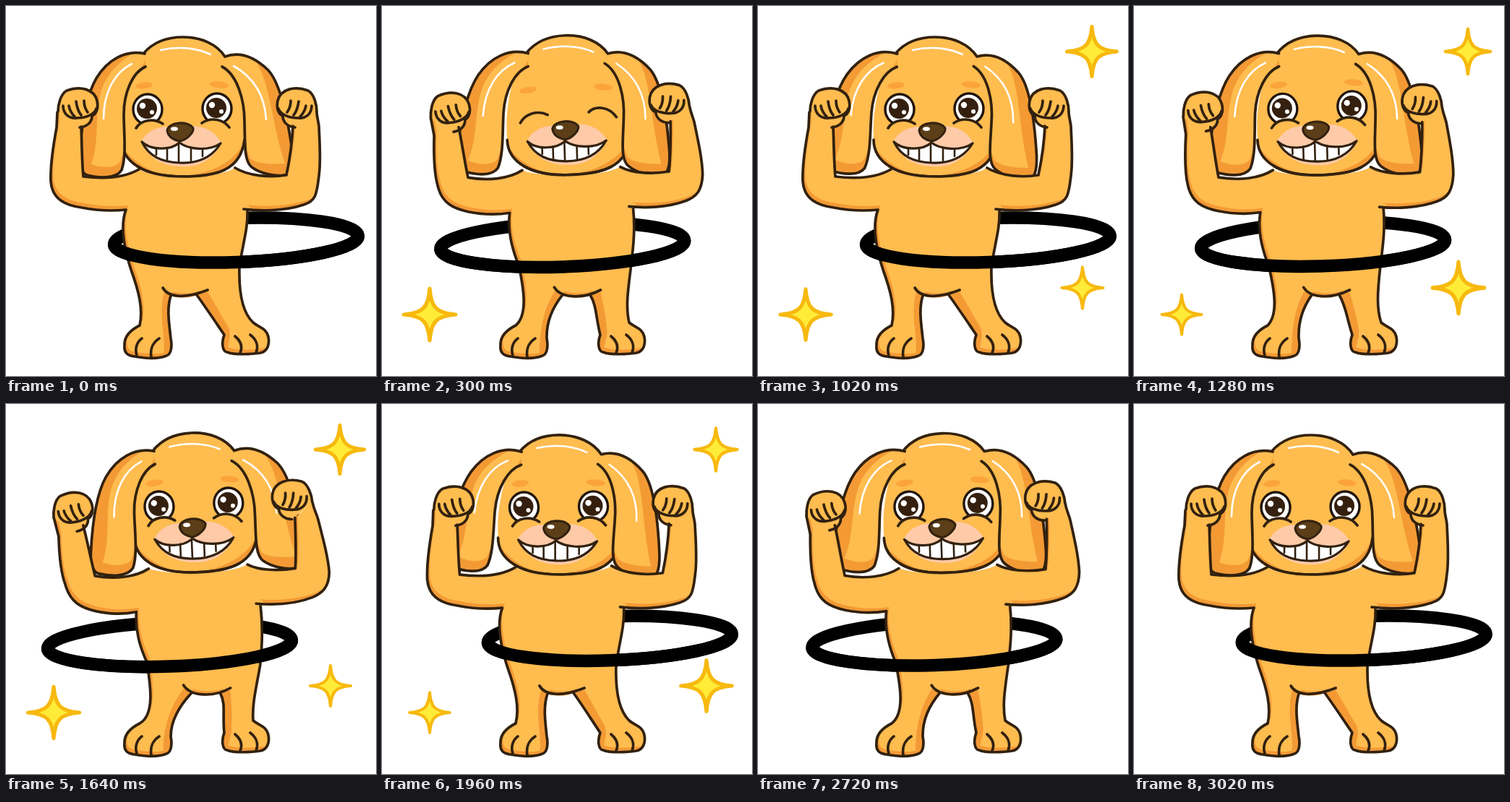
Recreate the animation shown at these times as an HTML page. Size 512x512 px, loop 3.04 s.

```html
<!DOCTYPE html>
<html lang="en">
<head>
<meta charset="utf-8">
<title>Hula hoop puppy</title>
<style>
  html, body { margin: 0; width: 100%; height: 100%; overflow: hidden; background: #fff; }
  svg { display: block; width: 100%; height: 100%; }
  .line { fill: none; stroke: #32210f; stroke-width: 3.7; stroke-linecap: round; stroke-linejoin: round; }
  .light { fill: #ffbc4f; }
  .shade { fill: #f39a35; }
  .pink { fill: #ffcaa8; }
  .shine { fill: none; stroke: #fff; stroke-width: 2.6; stroke-linecap: round; }
  .hoop { fill: none; stroke: #000; stroke-width: 17.5; }
  .star { fill: #ffec38; stroke: #f7b90e; stroke-width: 5; stroke-linejoin: round; }
</style>
</head>
<body>
<svg viewBox="0 0 512 512">
  <defs>
    <path id="body"/>
    <clipPath id="bodyClip"><use href="#body"/></clipPath>
    <path id="earL" d="M192 66C165 60 140 75 125 100C112 122 105 160 102 205C101 222 104 231 112 234C128 238 152 240 160 227C167 207 163 175 163 150C163 120 175 92 193 84"/>
    <path id="earR" d="M303 70C325 62 345 72 362 88C379 105 389 150 396 200C399 225 394 234 385 234C372 236 352 232 340 223C329 214 331 190 330 160C330 130 320 95 299 84"/>
    <clipPath id="earLClip"><use href="#earL"/></clipPath>
    <clipPath id="earRClip"><use href="#earR"/></clipPath>
    <g id="hand">
      <path class="light" d="M72 148C69 140 75 122 84 117C103 110 122 115 126 131C129 145 122 151 119 152C119 161 112 168 102 168"/>
      <path class="line" d="M72 146C72 138 75 122 84 117C103 110 122 115 126 131C129 145 122 151 119 152C119 161 112 167 102 168"/>
      <path class="line" d="M79 138C79 150 88 156 98 155C109 155 122 151 125 142M87 138C88 144 91 149 95 153M97 132C98 140 100 146 104 151M108 131C108 138 110 143 113 147"/>
    </g>
    <g id="eye">
      <ellipse rx="20" ry="21" fill="#fff" stroke="#20150c" stroke-width="3.4"/>
      <circle cx="-1" cy="-1" r="14" fill="#35200f"/>
      <circle cx="-7" cy="-5" r="4.2" fill="#fff"/>
      <circle cx="6" cy="4" r="3" fill="#fff"/>
    </g>
    <path id="star" class="star" d="M0-34C2-9 9-2 34 0C9 2 2 9 0 34C-2 9-9 2-34 0C-9-2-2-9 0-34Z"/>
  </defs>

  <g class="hoopPos"><ellipse class="hoop" rx="169" ry="30.5"/></g>

  <g class="headPos">
    <path class="light" d="M190 66C205 48 225 43 245 43C270 43 292 53 303 70C325 95 332 150 330 185C325 228 290 236 245 236C190 236 160 215 160 185C158 150 165 100 190 66"/>
    <path class="shade" d="M331 185C326 226 290 236 247 236C285 230 316 218 331 185M161 195C168 224 195 234 225 236C200 229 178 218 161 195"/>
    <path class="line" d="M190 66C205 48 225 43 245 43C270 43 292 53 303 70M330 185C325 228 290 236 245 236C190 236 160 215 160 185"/>
    <path class="shine" d="M214 61C235 56 262 57 283 67"/>

    <g id="brows" fill="#fba43a">
      <ellipse cx="191" cy="110" rx="12" ry="4.5" transform="rotate(-6 191 110)"/>
      <ellipse cx="295" cy="109" rx="13" ry="4.5" transform="rotate(6 295 109)"/>
    </g>

    <g id="open">
      <use href="#eye" x="196" y="143"/>
      <use href="#eye" x="292" y="142"/>
      <path class="light" d="M180 169C187 157 205 155 217 163L214 176L184 178ZM271 162C284 153 301 157 309 168L304 176L276 174Z"/>
      <path class="line" d="M180 169C187 157 205 155 217 163M271 162C284 153 301 157 309 168"/>
    </g>
    <path id="closed" class="line" d="M179 162C186 149 204 145 217 152M274 150C284 141 302 143 312 158"/>

    <path class="pink" d="M187 188C198 166 225 164 241 170C262 161 288 169 298 190C285 216 262 224 240 222C214 221 196 208 187 188"/>
    <path d="M188 188C200 200 228 200 240 189C252 198 280 202 297 190C285 210 265 218 240 217C215 216 198 208 188 188Z" fill="#fff" stroke="#32210f" stroke-width="3.2" stroke-linejoin="round"/>
    <path class="line" style="stroke-width:2.6" d="M208 197V206M223 196V213M239 191V216M256 197V214M272 198V208"/>
    <path d="M223 172C225 160 252 158 259 169C260 176 249 186 240 187C231 185 224 180 223 172Z" fill="#5c3e18" stroke="#32210f" stroke-width="3"/>
    <ellipse cx="233" cy="170" rx="5" ry="2.8" fill="#fff"/>

    <g id="swingL">
      <use href="#earL" class="shade"/>
      <g clip-path="url(#earLClip)"><path class="light" d="M205 50C170 66 141 85 131 120C122 155 130 185 118 219C135 225 150 224 158 216L170 180L175 110Z"/></g>
      <use href="#earL" class="line"/>
      <path class="shine" d="M174 80C150 92 135 120 135 156"/>
    </g>
    <g id="swingR">
      <use href="#earR" class="shade"/>
      <g clip-path="url(#earRClip)"><path class="light" d="M290 60L335 64C366 92 364 150 386 218C366 219 348 219 338 211L325 180Z"/></g>
      <use href="#earR" class="line"/>
      <path class="shine" d="M315 83C345 100 358 125 360 157"/>
    </g>
  </g>

  <use href="#body" class="shade"/>
  <g clip-path="url(#bodyClip)"><use href="#body" class="light" transform="translate(3.5 -6)"/></g>
  <path id="legs" class="shade"/>
  <g class="headPos"><path class="line" d="M182 222C196 231 218 236 245 236C268 236 288 234 302.5 226.6"/></g>
  <g id="handL"><use href="#hand"/></g>
  <g id="handR"><use href="#hand" transform="translate(502 0) scale(-1 1)"/></g>
  <path id="outline" class="line"/>
  <path id="crotch" class="line"/>
  <path class="line" d="M181 484C178 474 181 465 188 460M201 486C199 474 204 465 212 460M324 480C328 471 324 463 317 457M346 480C350 470 346 461 338 455"/>

  <g class="hoopPos"><path class="hoop" d="M-169 0A169 30.5 0 0 0 169 0"/></g>
  <g id="stars"></g>
</svg>
<script>
const LOOP = 3040, SWAY = LOOP / 3, EARS = LOOP / 4, PULSE = 640;
const $ = id => document.getElementById(id);
const set = (el, name, value) => el.setAttribute(name, value);

// Two poses per shape: leaning left and leaning right. K marks a curve that is filled but not stroked.
const footR = 'C350 445 360 445 363 458C365 468 362 478 352 480C340 482 315 483 306 479C299 478 298 465 302 455';
const footL = 'C230 470 229 482 222 484C212 488 195 488 178 485C168 484 163 480 164 470C163 455 175 447 185 442';
const bodyPose = [
  'M104 167C105 190 105 215 107 236C140 240 165 237 184 226K205 240 295 240 317 224' +
  'C335 235 365 238 388 234C392 215 396 190 397 166' +
  'M430 147C430 152 432 158 433 166C434 190 436 215 433 235C430 262 428 270 412 275C385 284 350 284 329 281' +
  'M334 283C335 310 327 330 323 362C322 400 328 425 342 438' + footR +
  'C285 430 275 415 264 400K255 404 240 405 228 401C222 420 226 440 228 460' + footL +
  'C190 420 184 395 173 365C165 340 157 305 166 282' +
  'C145 284 125 283 105 279C83 276 64 268 62 243C61 222 65 195 70 168L71 147',
  'M107 168C113 190 118 215 124 238C150 243 180 240 198 228K225 237 310 237 335 222' +
  'C350 230 378 231 401 227C402 205 401 180 400 157' +
  'M424 136C426 146 430 152 432 160C440 190 446 212 448 232C448 255 436 262 425 267C400 277 370 278 347 276' +
  'M353 278C357 310 356 335 353 362C347 395 341 415 342 438' + footR +
  'C300 430 306 415 298 400K290 404 265 405 258 400C240 418 228 440 228 460' + footL +
  'C208 430 200 385 196 357C186 335 180 315 181 288' +
  'C160 292 145 291 125 287C105 282 90 275 83 250C76 233 74 210 73 184L66 158'
];
const crotchPose = [
  'M217 390C225 404 248 405 279 393',
  'M247 389C256 404 288 407 312 393'
];
const legsPose = [
  'M228 400C222 420 226 440 228 460C230 472 226 482 218 484C222 455 210 430 219 396Z' +
  'M264 400C275 415 285 430 302 455C298 466 299 478 306 479C308 465 312 455 308 445C296 425 288 410 279 396Z',
  'M258 400C240 418 228 440 228 460C230 472 226 482 218 484C216 455 226 420 247 394Z' +
  'M298 400C306 415 300 430 302 455C298 466 299 478 306 479C308 465 314 455 312 445C315 425 312 410 312 396Z'
];

const mix = ([a, b], s) => {
  const ends = b.match(/-?[\d.]+/g);
  let i = 0;
  return a.replace(/-?[\d.]+/g, n => (+n + (ends[i++] - n) * s).toFixed(2));
};
const filled = d => 'M' + d.slice(1).replace(/M/g, 'L').replace(/K/g, 'C') + 'Z';
const stroked = d => d.replace(/K(\S+ ){4}/g, 'M');

const wave = (t, period) => (1 - Math.cos(2 * Math.PI * t / period)) / 2;
const smooth = w => w * w * (3 - 2 * w);

function sway(t) {
  const w = wave(t, SWAY);
  return 1.07 * (0.7 * w + 0.3 * smooth(w));
}

const stars = [
  { x: 66, y: 427, peak: 0.5, from: 200, to: 2340 },
  { x: 462, y: 63, peak: 0.73, from: 400, to: 2540 },
  { x: 449, y: 390, peak: 0.98, from: 600, to: 2700 }
];
for (const star of stars) {
  star.el = document.createElementNS('http://www.w3.org/2000/svg', 'use');
  set(star.el, 'href', '#star');
  $('stars').append(star.el);
}

const show = (el, on) => set(el, 'visibility', on ? 'visible' : 'hidden');
const setAll = (selector, transform) =>
  document.querySelectorAll(selector).forEach(el => set(el, 'transform', transform));

function draw(t) {
  const s = sway(t);
  const swing = 6 * wave(t, EARS);

  const d = mix(bodyPose, s);
  set($('body'), 'd', filled(d));
  set($('outline'), 'd', stroked(d));
  set($('crotch'), 'd', mix(crotchPose, s));
  set($('legs'), 'd', mix(legsPose, s));

  setAll('.hoopPos', `translate(${318.5 - 96.5 * s} ${324 + 9 * s}) rotate(-2)`);
  setAll('.headPos', `translate(${17 * s} ${-3 * s}) rotate(${-2.5 * s} 240 150)`);
  set($('swingL'), 'transform', `rotate(${swing} 190 75)`);
  set($('swingR'), 'transform', `rotate(${swing} 305 75)`);
  set($('handL'), 'transform', `translate(${-7 * s} ${9 * s}) rotate(${-6 * s} 100 140)`);
  set($('handR'), 'transform', `translate(${-7 * s} ${-9 * s}) rotate(${-5 * s} 402 140)`);

  const blink = t >= 180 && t < 480;
  show($('open'), !blink);
  show($('closed'), blink);
  set($('brows'), 'transform', `translate(0 ${blink ? 7 : 0})`);

  for (const { el, x, y, peak, from, to } of stars) {
    const size = 29.5 + 9 * wave(t - (peak - 0.5) * PULSE, PULSE);
    set(el, 'transform', `translate(${x} ${y}) scale(${size / 36.5})`);
    show(el, t >= from && t < to);
  }
}

function tick() {
  draw(performance.now() % LOOP);
  requestAnimationFrame(tick);
}
tick();
</script>
</body>
</html>
```
